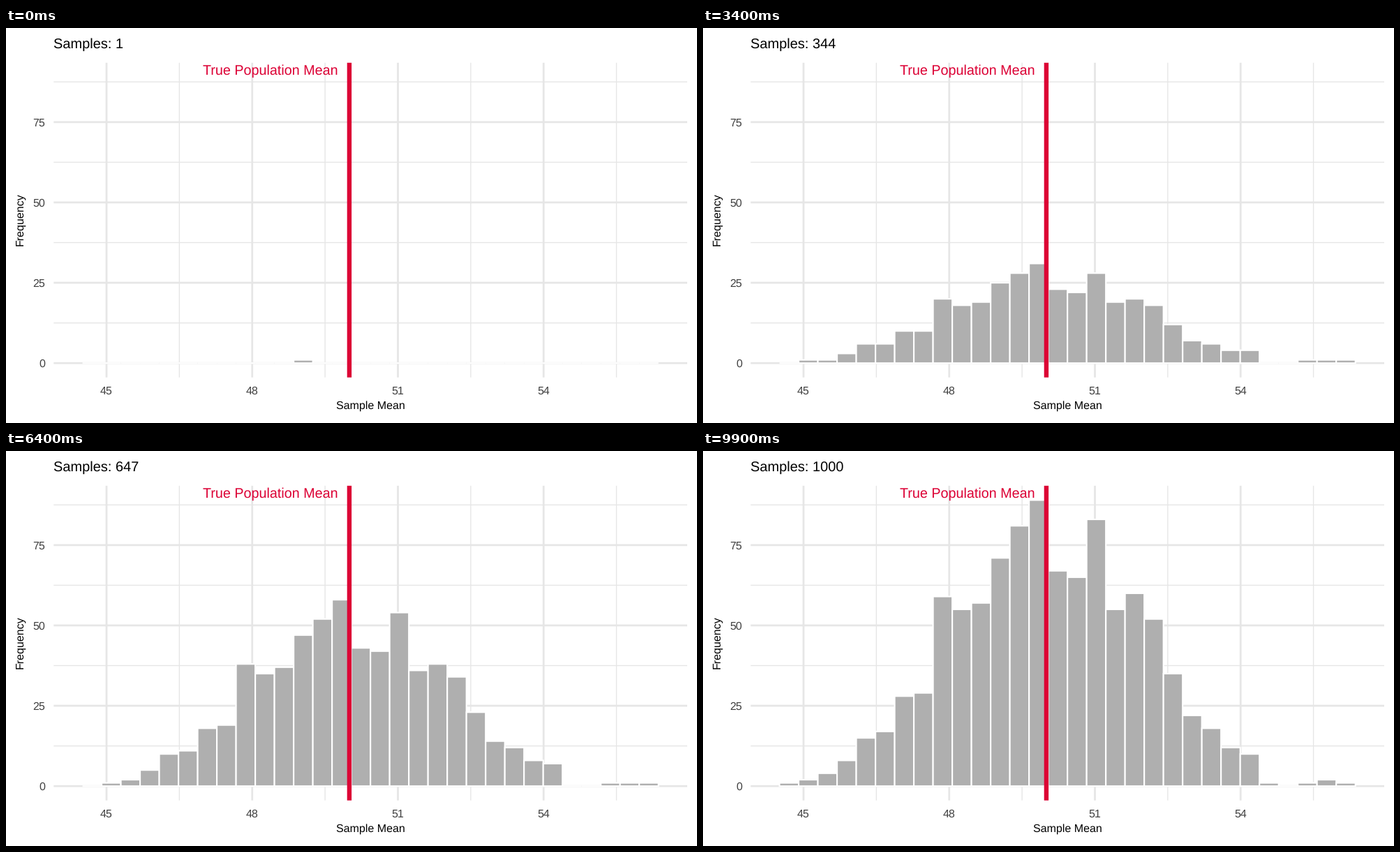
These frames come from a looping animation (990 px wide and 566 px high, 10 s). A matplotlib script:

```python
import matplotlib.pyplot as plt
import numpy as np
from matplotlib.animation import FuncAnimation
from matplotlib.patches import Rectangle

plt.rcParams["font.family"] = "Liberation Sans"
plt.rcParams["text.hinting"] = "none"

W, H, DPI = 990, 566, 72
FRAMES = 100
LEFT, RIGHT, TOP, BOTTOM = 68.3, 976, 49.8, 500.7
GRID, BAR, RED, TICK = "#e6e6e6", "#afafaf", "#dc0034", "#404040"

# Height of each bar once every sample is in
FINAL = np.array([1, 2, 4, 8, 15, 17, 28, 29, 59, 55, 57, 71, 81, 89, 67,
                  65, 83, 55, 60, 52, 35, 22, 18, 12, 10, 1, 0, 1, 2, 1])
BINS, TOTAL = len(FINAL), FINAL.sum()
FIRST_BIN, PHASE = 11, 0.565


def arrival_order():
    """Bin of each sample: every bin fills evenly, each with its own phase."""
    bins = np.repeat(np.arange(BINS), FINAL)
    rank = np.concatenate([np.arange(c) for c in FINAL])
    time = (rank + (bins - FIRST_BIN) * PHASE % 1) / FINAL[bins]
    return bins[np.argsort(time, kind="stable")]


ORDER = arrival_order()


def px(x):
    return 144 + (x - 45) * 69.58


def py(y):
    return 480.2 - y * 4.605


fig = plt.figure(figsize=(W / DPI, H / DPI), dpi=DPI, facecolor="white")
ax = fig.add_axes([0, 0, 1, 1])
ax.set(xlim=(0, W), ylim=(H, 0))
ax.axis("off")


def line(xs, ys, width, color=GRID, z=1):
    ax.plot(xs, ys, color=color, lw=width, zorder=z, snap=False,
            solid_capstyle="butt")


def label(x, y, s, size=16, color="black", ha="center", **kw):
    return ax.text(x, y, s, fontsize=size, color=color, ha=ha,
                   va="baseline", zorder=5, **kw)


def grid(xs, ys, width):
    for y in ys:
        line([LEFT, RIGHT], [py(y)] * 2, width)
    for x in xs:
        line([px(x)] * 2, [TOP, BOTTOM], width)


x_ticks, y_ticks = np.arange(45, 55, 3), np.arange(0, 76, 25)
grid(x_ticks + 1.5, y_ticks + 12.5, 1.36)
grid(x_ticks, y_ticks, 2.72)

for x in x_ticks:
    label(px(x), 525, str(x), color=TICK)
for y in y_ticks:
    label(56.3, py(y) + 5.8, str(y), color=TICK, ha="right")

label(522, 546, "Sample Mean")
label(24, 274, "Frequency", rotation=90, rotation_mode="anchor")
title = label(68.3, 29, "", size=20, ha="left")

margin = (RIGHT - LEFT) / 22
step = (RIGHT - LEFT - 2 * margin) / BINS
bars = [
    ax.add_patch(Rectangle((LEFT + margin + i * step, py(0)), step, 0,
                           fc=BAR, ec="white", lw=2.13, joinstyle="miter",
                           snap=False, zorder=2))
    for i in range(BINS)
]

line([px(50)] * 2, [TOP, BOTTOM], 6.4, RED, 4)
label(475.3, 67, "True Population Mean", size=19.8, color=RED, ha="right")


def update(i):
    n = round(1 + (TOTAL - 1) * i / (FRAMES - 1))
    title.set_text(f"Samples: {n}")
    for bar, count in zip(bars, np.bincount(ORDER[:n], minlength=BINS)):
        bar.set_height(py(count) - py(0))
    return [title, *bars]


anim = FuncAnimation(fig, update, frames=FRAMES, interval=100,
                     init_func=lambda: update(0), repeat=True, repeat_delay=0)
plt.show()
```
